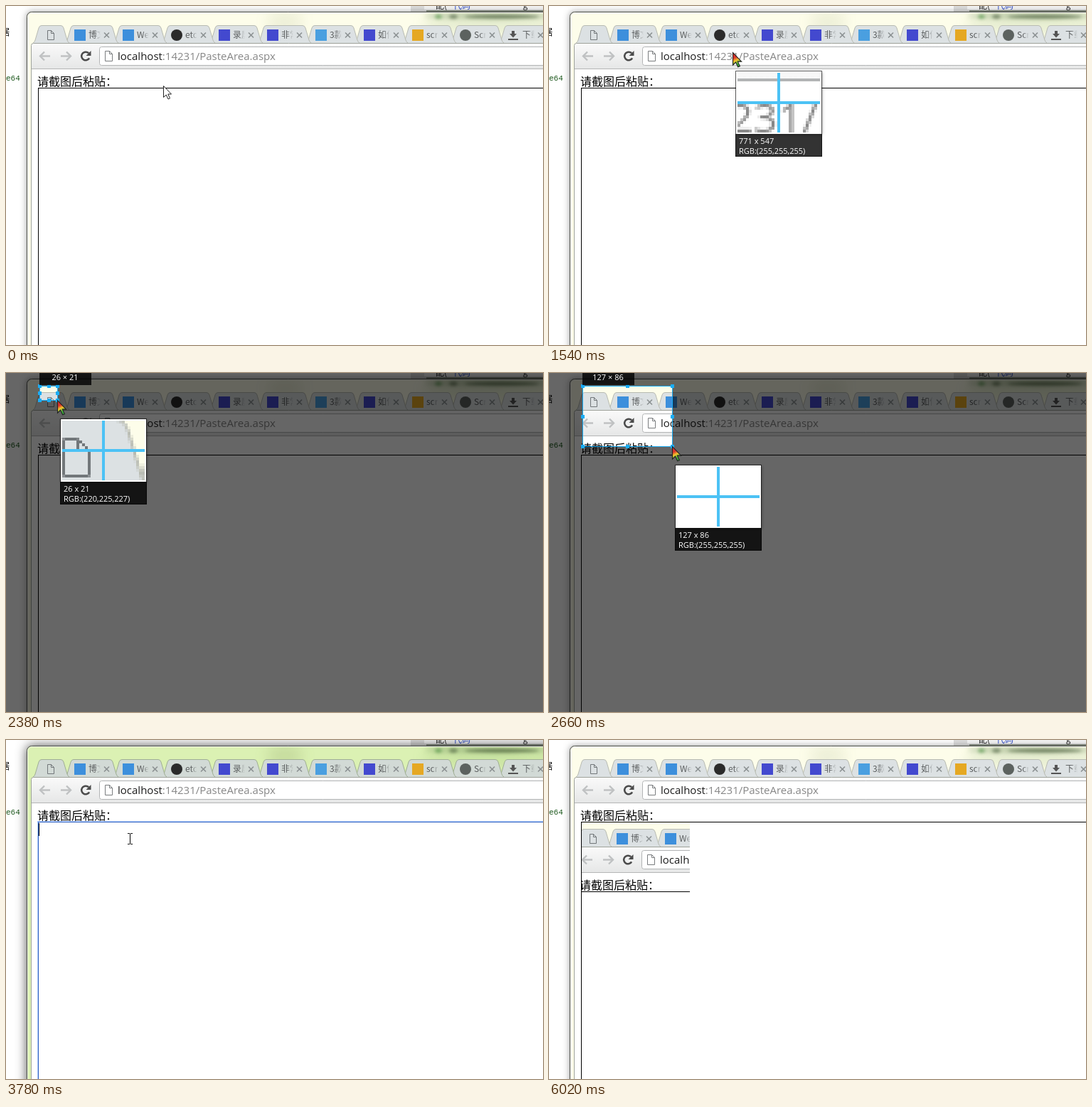
An HTML page with a canvas for the animation above (6.09 s loop, 755 by 477 pixels).

```html
<!DOCTYPE html>
<html lang="zh">
<head>
<meta charset="utf-8">
<style>
html, body { margin: 0; width: 100%; height: 100%; overflow: hidden; background: #fff; }
canvas { display: block; }
</style>
</head>
<body>
<canvas id="stage" width="755" height="477"></canvas>
<script>
const W = 755, H = 477, LOOP = 6090, TICK = 70;
const CJK = '"Noto Sans CJK SC", "Noto Sans CJK", sans-serif';
const LATIN = '"Open Sans", "Noto Sans", sans-serif';
const BLUE = '#1aadf5';
const SEL = { x: 47, y: 18 };

const TABS = [
  ['square', '#3d8fdc', '博文'], ['square', '#3d8fdc', 'Web'], ['circle', '#2b2b2b', 'etc'],
  ['square', '#4349cf', '录屏'], ['square', '#4349cf', '非常'], ['square', '#4a9fe0', '3款'],
  ['square', '#4349cf', '如何'], ['square', '#e5a823', 'scr'], ['circle', '#5c625f', 'Scr'],
  ['download', '#555', '下载']
];

// Pointer hot spot: time, x, y
const PATH = [
  [0, 221, 112], [280, 591, 297], [350, 588, 299], [420, 588, 299], [560, 586, 305],
  [630, 586, 305], [980, 456, 250], [1050, 456, 250], [1120, 443, 245],
  [1190, 579, 191], [1680, 130, 14], [1750, 118, 40], [1820, 104, 30], [1890, 86, 19],
  [2170, 47, 18], [2310, 47, 18], [2380, 72, 38], [2730, 198, 119], [2800, 198, 119],
  [3360, 174, 139], [3920, 174, 139], [4270, 160, 158], [4690, 160, 158],
  [5040, 613, 471], [5180, 613, 471], [5530, 642, 487]
];

function pointerAt(t) {
  const i = PATH.findIndex(k => k[0] > t);
  if (i < 0) return PATH[PATH.length - 1].slice(1);
  const [a, b] = [PATH[i - 1], PATH[i]];
  const p = (t - a[0]) / (b[0] - a[0]);
  return [1, 2].map(n => Math.round(a[n] + (b[n] - a[n]) * p));
}

const clamp = v => Math.max(0, Math.min(1, v));
const blend = (a, b, p) => `rgb(${a.map((v, i) => Math.round(v + (b[i] - v) * p))})`;

function rect(g, color, x, y, w, h) {
  g.fillStyle = color;
  g.fillRect(x, y, w, h);
}

function poly(g, pts, fill, stroke, width = 1, close = true) {
  g.beginPath();
  pts.forEach(([x, y]) => g.lineTo(x, y));
  if (close) g.closePath();
  if (fill) { g.fillStyle = fill; g.fill(); }
  if (stroke) { g.strokeStyle = stroke; g.lineWidth = width; g.stroke(); }
}

function line(g, color, width, ...pts) {
  poly(g, pts, null, color, width, false);
}

function round(g, x, y, w, h, r, fill, stroke) {
  g.beginPath();
  g.roundRect(x, y, w, h, r);
  if (fill) { g.fillStyle = fill; g.fill(); }
  if (stroke) { g.strokeStyle = stroke; g.lineWidth = 1; g.stroke(); }
}

function disc(g, color, x, y, r) {
  g.fillStyle = color;
  g.beginPath();
  g.arc(x, y, r, 0, 7);
  g.fill();
}

function text(g, str, x, y, font, color, align = 'left') {
  g.font = font;
  g.fillStyle = color;
  g.textAlign = align;
  g.fillText(str, x, y);
}

function vertical(g, y0, y1, a, b) {
  const s = g.createLinearGradient(0, y0, 0, y1);
  s.addColorStop(0, a);
  s.addColorStop(1, b);
  return s;
}

function smudge(g, color, x, y, rx, ry, blur) {
  g.save();
  g.filter = `blur(${blur}px)`;
  g.fillStyle = color;
  g.beginPath();
  g.ellipse(x, y, rx, ry, 0, 0, 7);
  g.fill();
  g.restore();
}

function page(g, x, y, w, h, color) {
  const f = 4;
  poly(g, [[x, y], [x + w - f, y], [x + w, y + f], [x + w, y + h], [x, y + h]], null, color);
  line(g, color, 1, [x + w - f, y], [x + w - f, y + f], [x + w, y + f]);
}

function tabShape(g, x, w, fill, edge) {
  const r = x + w;
  g.beginPath();
  g.moveTo(x, 52);
  g.quadraticCurveTo(x + 2, 51, x + 3, 48);
  g.lineTo(x + 8, 31);
  g.quadraticCurveTo(x + 9, 27.5, x + 12, 27.5);
  g.lineTo(r - 12, 27.5);
  g.quadraticCurveTo(r - 9, 27.5, r - 8, 31);
  g.lineTo(r - 3, 48);
  g.quadraticCurveTo(r - 2, 51, r, 52);
  g.fillStyle = fill;
  g.fill();
  g.strokeStyle = edge;
  g.lineWidth = 1;
  g.stroke();
}

function tabIcon(g, kind, color, x) {
  if (kind === 'square') rect(g, color, x, 33, 16, 16);
  else if (kind === 'circle') disc(g, color, x + 8, 41, 8);
  else {
    rect(g, color, x + 5, 35, 4, 5);
    poly(g, [[x + 2, 39], [x + 12, 39], [x + 7, 44.5]], color);
    rect(g, color, x, 46, 14, 2);
  }
}

function drawTabs(g, active) {
  const fill = blend([220, 225, 227], [206, 216, 209], active);
  const edge = blend([184, 187, 178], [150, 170, 138], active);
  for (let i = TABS.length - 1; i >= 0; i--) {
    const [kind, color, label] = TABS[i];
    const x = Math.round(85 + 67.8 * i);
    tabShape(g, x - 2, 75, fill, edge);
    tabIcon(g, kind, color, x + 11);
    const fade = g.createLinearGradient(x + 39, 0, x + 48, 0);
    fade.addColorStop(0, '#5a5d5e');
    fade.addColorStop(1, 'rgba(90,93,94,0)');
    text(g, label, x + 31, 45, '12px ' + CJK, fade);
    line(g, '#8b9092', 1.6, [x + 53, 37.5], [x + 60, 44.5]);
    line(g, '#8b9092', 1.6, [x + 60, 37.5], [x + 53, 44.5]);
  }
  tabShape(g, 38, 51, fill, edge);
  page(g, 58.5, 34.5, 9, 13, '#72777a');
}

function drawBehind(g, active) {
  rect(g, '#fff', 0, 0, W, H);
  text(g, '据', -8, 41, '13px ' + CJK, '#111');
  text(g, 'e64', 0, 105, '11px "Liberation Mono", monospace', '#1f5a1f');
  rect(g, '#dedede', 569, 0, 186, 9);
  rect(g, '#f6f6f6', 588, 0, 167, 5);
  text(g, '配(', 604, 4, '12px ' + CJK, '#222');
  text(g, '代码', 629, 4, '12px ' + CJK, '#2a48c8');
  text(g, 'g', 727, 3, '12px ' + LATIN, '#222');
  rect(g, '#8c9488', 591, 6, 164, 2);
  g.save();
  g.shadowColor = `rgba(0,0,0,${0.38 + 0.4 * active})`;
  g.shadowBlur = 10 + 6 * active;
  round(g, 29, 8, 800, 560, 7, '#888');
  g.restore();
}

function drawFrame(g, active) {
  g.save();
  g.beginPath();
  g.roundRect(29.5, 8.5, 800, 560, 7);
  g.clip();
  rect(g, blend([253, 253, 234], [207, 237, 160], active), 29, 8, W, H);
  smudge(g, `rgba(90,110,50,${0.09 + 0.08 * active})`, 392, 22, 26, 16, 9);
  smudge(g, 'rgba(120,160,80,.16)', 680, 24, 95, 16, 8);
  smudge(g, 'rgba(110,140,90,.35)', 680, 14, 92, 5, 3);
  smudge(g, 'rgba(40,60,30,.55)', 697, 15, 52, 2.5, 2);
  smudge(g, 'rgba(70,140,60,.6)', 608, 15, 5, 3, 2);
  smudge(g, 'rgba(50,70,40,.5)', 629, 15, 6, 3, 2);
  g.restore();
  round(g, 29.5, 8.5, 800, 560, 7, null, '#4d5049');
  round(g, 30.5, 9.5, 800, 560, 6, null, 'rgba(255,255,255,.75)');
}

function drawToolbar(g) {
  round(g, 35.5, 52.5, 800, 500, 3, vertical(g, 52, 88, '#fafafa', '#e6e7e7'), '#9fa39b');

  for (const [tip, dir] of [[47, 1], [92, -1]]) {
    line(g, '#bfc1c2', 2.4, [tip + dir, 70.5], [tip + 15 * dir, 70.5]);
    line(g, '#bfc1c2', 2.4, [tip + 7 * dir, 64.5], [tip + dir, 70.5], [tip + 7 * dir, 76.5]);
  }
  g.strokeStyle = '#4b4b4b';
  g.lineWidth = 2.5;
  g.beginPath();
  g.arc(112, 70.5, 5.8, 0.5, 5.5);
  g.stroke();
  poly(g, [[119.5, 63], [119.5, 70], [112.5, 70]], '#4b4b4b');

  round(g, 131.5, 57.5, 700, 26, 3, '#fff', '#b2b4b5');
  page(g, 139.5, 63.5, 10, 14, '#7a7d7f');
  const font = '15px ' + LATIN;
  text(g, 'localhost', 157, 76, font, '#1c1c1c');
  text(g, ':14231/PasteArea.aspx', 157 + g.measureText('localhost').width, 76, font, '#878787');
}

function drawPage(g, focused) {
  rect(g, '#fff', 36, 89, W, H);
  rect(g, '#b5b6b6', 36, 88, W, 1);
  text(g, '请截图后粘贴：', 44, 112, '16px ' + CJK, '#000');
  const edge = focused ? '#2a5cbe' : '#000';
  rect(g, edge, 45, 115, W, 1);
  rect(g, edge, 45, 115, 1, H);
  if (focused) {
    rect(g, 'rgba(77,144,254,.4)', 44, 114, W, 1);
    rect(g, 'rgba(77,144,254,.4)', 44, 114, 1, H);
  }
}

function drawDesktop(g, active, focused) {
  drawBehind(g, active);
  drawFrame(g, active);
  drawTabs(g, active);
  drawToolbar(g);
  drawPage(g, focused);
}

const ARROW = [[0, 0], [0, 16], [3.7, 12.5], [6.5, 18.5], [9, 17.4], [6.3, 11.5], [11, 11.5]];

function drawArrow(g, x, y, colorful) {
  g.save();
  g.translate(x + 0.5, y + 0.5);
  let fill = '#fff';
  if (colorful) {
    g.scale(1.1, 1.1);
    fill = g.createLinearGradient(0, 3, 7, 18);
    ['#d8322c', '#d8322c', '#f3c52e', '#48b83c', '#2f9a3a'].forEach((c, i) => fill.addColorStop(i / 4, c));
  }
  poly(g, ARROW, fill, '#222');
  g.restore();
}

function drawBeam(g, x, y) {
  for (const dy of [-8, 7]) {
    rect(g, '#000', x - 3, y + dy, 3, 1);
    rect(g, '#000', x + 1, y + dy, 3, 1);
  }
  rect(g, '#000', x, y - 7, 1, 14);
}

const still = document.createElement('canvas');
still.width = W;
still.height = H;
const stillCtx = still.getContext('2d', { willReadFrequently: true });

function drawLens(g, x, y, size) {
  const px = x + 4, py = y + 26;
  g.save();
  g.shadowColor = 'rgba(0,0,0,.4)';
  g.shadowBlur = 4;
  g.shadowOffsetX = g.shadowOffsetY = 1;
  rect(g, '#fff', px + 1, py + 1, 120, 88);
  g.restore();
  g.strokeStyle = 'rgba(0,0,0,.6)';
  g.lineWidth = 1;
  g.strokeRect(px + 0.5, py + 0.5, 121, 120);
  g.imageSmoothingEnabled = false;
  g.drawImage(still, x - 14, y - 10, 29, 21, px + 3, py + 3, 116, 84);
  rect(g, '#4cc2f5', px + 59, py + 3, 4, 84);
  rect(g, '#4cc2f5', px + 3, py + 43, 116, 4);
  rect(g, 'rgba(0,0,0,.8)', px, py + 89, 122, 32);
  const rgb = stillCtx.getImageData(x, y, 1, 1).data.slice(0, 3).join(',');
  text(g, size, px + 5, py + 103, '11px ' + LATIN, '#fff');
  text(g, `RGB:(${rgb})`, px + 5, py + 117, '11px ' + LATIN, '#fff');
}

function drawSelection(g, w, h) {
  const { x, y } = SEL;
  rect(g, 'rgba(0,0,0,.6)', 0, 0, W, H);
  g.drawImage(still, x, y, w, h, x, y, w, h);
  g.strokeStyle = BLUE;
  g.lineWidth = 1;
  g.strokeRect(x + 0.5, y + 0.5, w - 1, h - 1);
  for (let i = 0; i < 9; i++) {
    if (i === 4) continue;
    const hx = Math.round(x + (w - 1) * (i % 3) / 2);
    const hy = Math.round(y + (h - 1) * Math.floor(i / 3) / 2);
    rect(g, BLUE, hx - 2, hy - 2, 5, 5);
  }
  rect(g, 'rgba(0,0,0,.8)', 47, 0, 73, 17);
  text(g, `${w} × ${h}`, 83, 10, '11px ' + LATIN, '#fff', 'center');
}

function drawActions(g) {
  rect(g, '#e9eef6', 0, 125, 198, 26);
  // save
  poly(g, [[5, 131], [17, 131], [20, 134], [20, 146], [5, 146]], '#6480c4');
  rect(g, '#e9eef6', 8, 132, 8, 4);
  rect(g, '#e9eef6', 8, 139, 9, 6);
  rect(g, '#6480c4', 9, 141, 7, 1);
  // phone
  round(g, 33, 130, 13, 17, 2, '#3d95db');
  rect(g, '#cfe5f8', 35, 132, 9, 11);
  rect(g, '#fff', 38, 144, 3, 2);
  // share
  line(g, '#2e93d6', 2, [66, 134], [60, 134], [60, 145], [72, 145], [72, 140]);
  line(g, '#2e93d6', 2.4, [64, 142], [65, 137], [71, 135]);
  poly(g, [[69, 130], [75, 135], [69, 139]], '#2e93d6');
  // bookmark
  poly(g, [[87, 131], [100, 131], [100, 147], [93.5, 143], [87, 147]], '#25a5e2');
  const star = Array.from({ length: 10 }, (_, i) => {
    const a = i * Math.PI / 5, r = i % 2 ? 1.9 : 4.5;
    return [93.5 + r * Math.sin(a), 137.5 - r * Math.cos(a)];
  });
  poly(g, star, '#fff');
  rect(g, '#c3cad4', 109, 132, 1, 13);
  line(g, '#cf3a2f', 3, [120, 133], [131, 144]);
  line(g, '#cf3a2f', 3, [131, 133], [120, 144]);
  // finish
  round(g, 141.5, 128.5, 52, 19, 2, '#dbe0e9', '#8e949e');
  line(g, '#4fae32', 3.4, [145, 138], [150, 143], [160, 133]);
  text(g, '完成', 165, 142.5, '12px ' + CJK, '#111');
}

function render(g, now) {
  const t = Math.floor((now % LOOP) / TICK) * TICK;
  const [x, y] = pointerAt(t);
  const between = (a, b) => t >= a && t < b;
  const active = t >= 5950 ? clamp((6020 - t) / 140) : clamp((t - 3570) / 280);
  drawDesktop(g, active, between(3640, 5950));

  if (t >= 4480) g.drawImage(still, SEL.x, SEL.y, 152, 102, 46, 116, 152, 102);
  if (between(3640, 4200)) rect(g, '#000', 46, 117, 1, 18);
  if (between(4760, 5250) || between(5670, 5950)) rect(g, '#000', 46, 116, 1, 104);

  if (between(1190, 2380)) {
    drawLens(g, x, y, '771 x 547');
    drawArrow(g, x, y, true);
  } else if (between(2380, 2870)) {
    const w = x - SEL.x + 1, h = y - SEL.y + 1;
    drawSelection(g, w, h);
    drawLens(g, x, y, `${w} x ${h}`);
    drawArrow(g, x, y, true);
  } else if (between(2870, 3500)) {
    drawSelection(g, 152, 102);
    drawActions(g);
    drawArrow(g, x, y);
  } else if (y < 116) {
    drawArrow(g, x, y);
  } else {
    drawBeam(g, x, y);
  }
}

drawDesktop(stillCtx, 0, false);
const ctx = document.getElementById('stage').getContext('2d');
const start = performance.now();
function loop() {
  render(ctx, performance.now() - start);
  requestAnimationFrame(loop);
}
loop();
</script>
</body>
</html>
```
